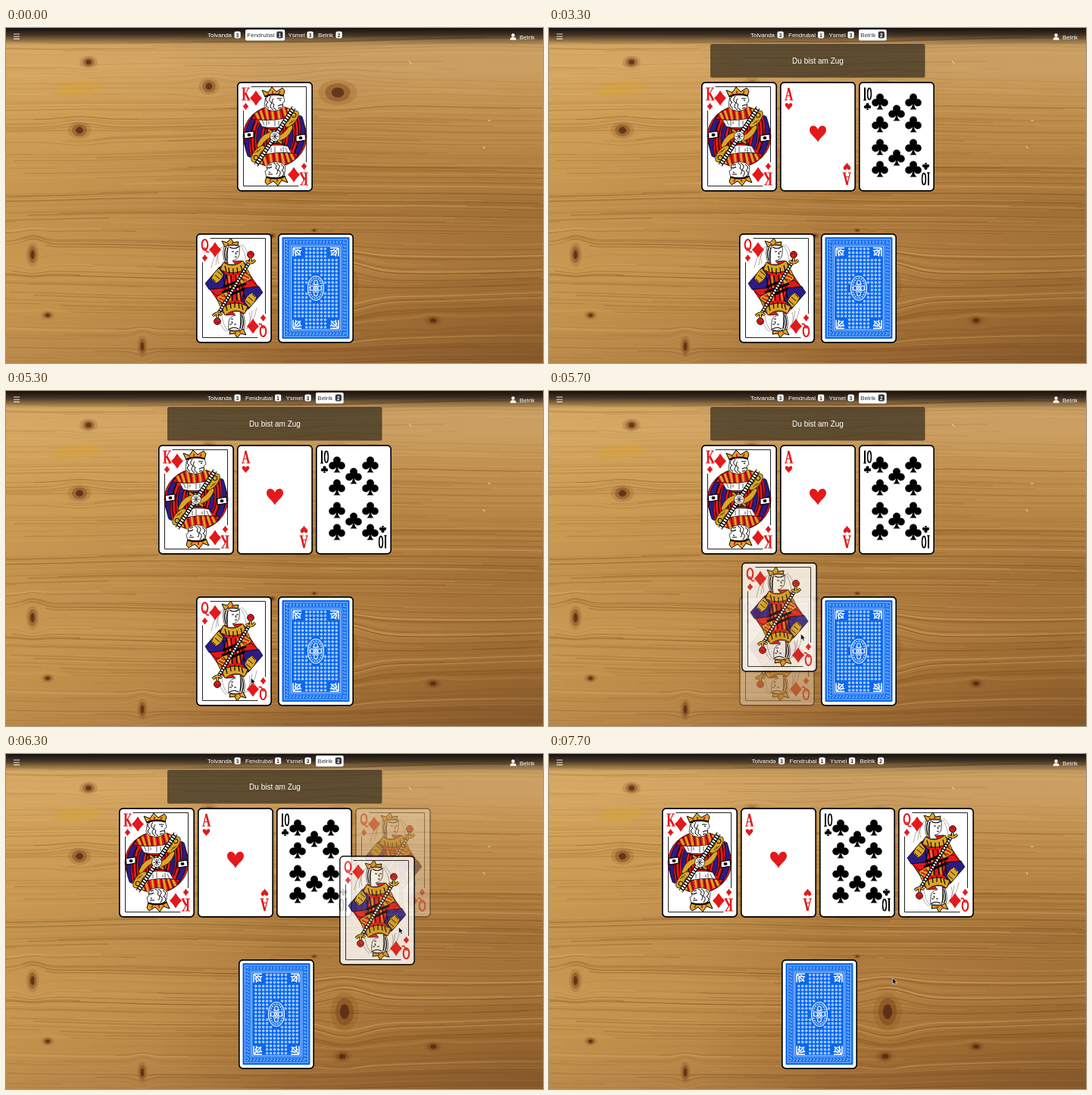
Animation, 709 px wide and 442 px high, one loop 8000 ms. Source, as an HTML page with a canvas:

```html
<!DOCTYPE html>
<html lang="de">
<head>
<meta charset="utf-8">
<title>Kartenspiel</title>
<style>
  html, body { margin: 0; width: 100%; height: 100%; overflow: hidden; background: #b5853f; }
  canvas { display: block; }
</style>
</head>
<body>
<canvas id="stage" width="709" height="442"></canvas>
<script>
const W = 709, H = 442, LOOP = 8000, TAU = Math.PI * 2;
const RED = '#e3191b', BLUE = '#2b1b86', GOLD = '#dba622', INK = '#000';
const CARD_W = 100, CARD_H = 145;
const FONT = '"Liberation Sans", Arial, sans-serif';

// ---------- helpers ----------
function picture(w, h, paint) {
  const canvas = document.createElement('canvas');
  canvas.width = w;
  canvas.height = h;
  paint(canvas.getContext('2d'));
  return canvas;
}

function shape(g, d, fill, stroke, width = 0.7) {
  const path = new Path2D(d);
  if (fill) { g.fillStyle = fill; g.fill(path); }
  if (stroke) { g.strokeStyle = stroke; g.lineWidth = width; g.stroke(path); }
}

const line = (g, d, color, width) => shape(g, d, null, color, width);

function oval(g, x, y, rx, ry, angle, fill, stroke, width = 0.7) {
  g.beginPath();
  g.ellipse(x, y, rx, ry, angle, 0, TAU);
  if (fill) { g.fillStyle = fill; g.fill(); }
  if (stroke) { g.strokeStyle = stroke; g.lineWidth = width; g.stroke(); }
}

function box(g, x, y, w, h, r, fill) {
  g.beginPath();
  g.roundRect(x, y, w, h, r);
  g.fillStyle = fill;
  g.fill();
}

function wash(g, gradient, stops, height = H) {
  stops.forEach(([at, color]) => gradient.addColorStop(at, color));
  g.fillStyle = gradient;
  g.fillRect(0, 0, W, height);
}

function write(g, text, x, y, font, color, align = 'left') {
  g.font = `${font} ${FONT}`;
  g.fillStyle = color;
  g.textAlign = align;
  g.fillText(text, x, y);
}

function turnTwice(g, paint) {
  paint(g);
  g.save();
  g.translate(CARD_W, CARD_H - 1);
  g.rotate(Math.PI);
  paint(g);
  g.restore();
}

// ---------- table ----------
function randomizer(seed) {
  return () => {
    seed = (seed * 1664525 + 1013904223) % 4294967296;
    return seed / 4294967296;
  };
}

const knots = [
  [109, 45, 7, 6], [97, 135, 9, 8], [268, 77, 8, 8], [438, 85, 15, 12],
  [447, 340, 11, 18], [564, 386, 7, 5], [35, 299, 5, 11], [444, 399, 8, 6],
  [180, 420, 4, 10], [55, 379, 5, 4], [351, 274, 4, 3], [407, 267, 3, 2]
];

function bend(x, y) {
  let shift = 3 * Math.sin(x / 150 + y / 70) + Math.sin(x / 60 + y / 31);
  for (const [kx, ky, rx, ry] of knots) {
    const dx = (x - kx) / (rx * 3.4), dy = (y - ky) / (ry * 2.2);
    shift += ry * Math.tanh(dy * 3) * Math.exp(-dx * dx - dy * dy);
  }
  return y + shift;
}

const table = picture(W, H, g => {
  const rnd = randomizer(11);
  wash(g, g.createLinearGradient(0, 0, 0, H), [
    [0, '#c79c62'], [.12, '#cb9f62'], [.22, '#c1914f'], [.36, '#b98745'], [.49, '#b07d3f'], [.52, '#a57438'],
    [.62, '#ae7b3e'], [.72, '#b48142'], [.86, '#a87538'], [1, '#976634']
  ]);
  wash(g, g.createLinearGradient(0, 0, 380, 0), [
    [0, 'rgba(226,178,100,.48)'], [.5, 'rgba(226,178,100,.34)'], [1, 'rgba(226,178,100,0)']
  ]);
  wash(g, g.createRadialGradient(W, H, 0, W, H, 300), [
    [0, 'rgba(80,45,14,.28)'], [1, 'rgba(80,45,14,0)']
  ]);

  for (let i = 0; i < 420; i++) {
    const y = rnd() * H, from = rnd() * W - 250, to = from + 150 + rnd() * 600;
    const lower = y > 210 && y < 340 ? 1.4 : 1;
    g.beginPath();
    for (let x = from; x <= to; x += 8) g.lineTo(x, bend(x, y));
    g.strokeStyle = rnd() < .58
      ? `rgba(105,58,16,${(.05 + rnd() * .15) * lower})`
      : `rgba(235,192,122,${.05 + rnd() * .15})`;
    g.lineWidth = .5 + rnd() * 1.3;
    g.stroke();
  }
  for (const y of [228, 330]) {
    g.beginPath();
    for (let x = 0; x <= W; x += 8) g.lineTo(x, bend(x, y));
    g.strokeStyle = 'rgba(85,48,16,.3)';
    g.lineWidth = 1.2;
    g.stroke();
  }
  oval(g, 95, 80, 32, 9, -.1, 'rgba(212,162,52,.45)');
  for (const [x, y, rx, ry] of knots) {
    oval(g, x, y, rx * 1.7, ry * 1.4, 0, 'rgba(130,72,24,.2)');
    oval(g, x, y, rx * 1.1, ry, 0, 'rgba(112,58,20,.4)');
    oval(g, x, y, rx * .55, ry * .55, 0, 'rgba(66,30,14,.65)');
  }
  line(g, 'M532 43L535 47M636 122H640M630 156L632 159', '#e6d3b4', 1.2);

  wash(g, g.createLinearGradient(0, 0, 0, 23), [
    [0, 'rgba(14,11,12,.96)'], [.4, 'rgba(18,14,13,.74)'], [.75, 'rgba(18,14,13,.27)'], [1, 'rgba(18,14,13,0)']
  ], 23);
});

// ---------- cards ----------
const ball = (x, y, r) => `M${x - r} ${y}a${r} ${r} 0 1 1 ${2 * r} 0a${r} ${r} 0 1 1 ${-2 * r} 0`;
const suits = {
  diamond: 'M0-1Q.35-.4 .8 0Q.35 .4 0 1Q-.35 .4-.8 0Q-.35-.4 0-1Z',
  heart: 'M0 1C-.3 .4-1 .1-1-.45C-1-1.1-.2-1.15 0-.5C.2-1.15 1-1.1 1-.45C1 .1 .3 .4 0 1Z',
  club: ball(0, -.5, .45) + ball(-.53, .14, .45) + ball(.53, .14, .45) +
    'M-.2-.2H.2L.1 .3Q.15 .8 .42 .95H-.42Q-.15 .8-.1 .3Z'
};

function pip(g, suit, x, y, size, color) {
  g.save();
  g.translate(x, y);
  g.scale(size, size);
  shape(g, suits[suit], color);
  g.restore();
}

const ranks = {
  K: [['M9 8V24M11 15L16 24', 2.6], ['M6 8H12M6 24H12M13 8H17M13 24H17.5M15.5 8L10 17', 1.2]],
  Q: [['M7.7 15a3.8 7 0 1 0 7.6 0a3.8 7 0 1 0-7.6 0', 2.1], ['M9.5 20Q12 18 13 22T17.3 24', 1.6]],
  A: [['M11.3 8L15.3 24', 2.6], ['M11.3 8L7.5 24M9 18.5H14M6 24H10M12.5 24H17.5', 1.2]],
  10: [['M8 7.5V24', 2], ['M6.3 24H9.8M11.6 15.8a2.4 7.6 0 1 0 4.8 0a2.4 7.6 0 1 0-4.8 0', 1.6]]
};

function corner(g, rank, suit, color) {
  for (const [d, width] of ranks[rank]) line(g, d, color, width);
  pip(g, suit, 11.5, 32.5, 4.8, color);
}

function card(paint) {
  return picture(CARD_W, CARD_H, g => {
    g.beginPath();
    g.roundRect(.8, .8, 98.4, 143, 5);
    g.fillStyle = '#fff';
    g.fill();
    g.strokeStyle = INK;
    g.lineWidth = 1.7;
    g.stroke();
    paint(g);
  });
}

function court(rank, figure, sash) {
  return card(g => {
    turnTwice(g, () => {
      line(g, 'M18.5 6.5H91.5M8.5 38V137.5', '#222', 1);
      g.save();
      g.clip(new Path2D('M-5 158L105-14H-5Z'));
      figure(g);
      g.restore();
    });
    sash(g);
    turnTwice(g, () => {
      pip(g, 'diamond', 25, 21.5, 10, RED);
      corner(g, rank, 'diamond', RED);
    });
  });
}

function beads(g, d, width) {
  line(g, d, INK, width);
  g.setLineDash([2.2, 1.5]);
  line(g, d, '#fff', width - 2);
  g.setLineDash([]);
}

const king = court('K', g => {
  oval(g, 50, 72, 42, 40, 0, RED, INK);
  shape(g, 'M22 43Q3 68 14 98L18 100Q11 72 26 47Z', BLUE, INK);
  shape(g, 'M30 55Q22 72 29 96L34 92Q28 74 35 58Z', BLUE, INK);
  line(g, 'M24 52Q14 74 22 102M28 54Q19 74 26 99M38 60Q33 74 37 92M41 61Q37 74 40 86', INK, 1.2);
  shape(g, 'M26 84Q33 65 50 66L52 71Q38 72 29 90Z', GOLD, INK);
  shape(g, 'M36 61Q50 66 68 57L62 70L48 68Z', '#3a2a20', INK);
  line(g, 'M41 63L46 67M49 64V68M56 62L53 67', GOLD, 2);
  shape(g, 'M9 67L22 65V73L10 75Z', '#fff', INK, 1.2);
  oval(g, 16, 70, 2.5, 2, 0, INK);
  oval(g, 28, 95, 13, 6, -.9, GOLD, INK);
  oval(g, 25, 100, 3, 3, 0, null, INK, 1);
  line(g, 'M24 94L28 90M29 97L33 91M27 93L31 88', '#3d2a06', .9);
  shape(g, 'M26 46Q50 55 75 40L68 57Q50 63 33 59Z', '#fff', INK);
  line(g, 'M39 50V58M42 52V56M50 51V59M55 51V57M63 48V56M33 50L36 57', '#333', .8);
  shape(g, 'M19 49Q24 38 39 33H62Q74 36 79 44Q50 54 19 49Z', RED, INK);
  line(g, 'M25 41L29 49M31 38L35 50M38 34L41 50M46 34L48 50M54 34L56 49M61 33L65 47M67 36L72 45', GOLD, 2.8);
  line(g, 'M22 44L26 50M28 39L32 50M34 36L38 51M42 34L44 50M50 34L52 50M58 34L61 48M64 34L69 46', INK, .7);
  shape(g, 'M38 17H61L63 26L60 28Q63 35 53 38Q41 40 36 32Z', '#fff', INK);
  line(g, 'M41 19Q35 24 41 27Q35 31 42 35M45 19Q40 25 46 28Q41 33 48 37M48 22Q44 27 49 30Q46 34 52 37', INK, 1);
  line(g, 'M53 22H59M56 24L58 25M54 32Q58 29 61 31M54 35L58 34', INK, 1.1);
  shape(g, 'M37 20L33 11L41 14L46 7L52 13L60 8L63 12L61 19Q49 15 37 20Z', GOLD, INK, 1);
  line(g, 'M40 15L43 17M47 12V16M57 12L55 16', RED, 2);
  line(g, 'M37 19Q49 14 61 18', INK, 1.4);
}, g => {
  beads(g, 'M25 110L75 34', 6);
  oval(g, 50, 72, 6.5, 6.5, 0, '#fff', INK);
  line(g, 'M45 72H55M50 67V77M47 68L53 76M53 68L47 76', '#222', .9);
});

const queen = court('Q', g => {
  line(g, 'M36 16Q27 26 26 42M33 18Q23 28 20 46M58 15Q65 24 66 36M60 14Q69 22 70 34M31 22Q27 30 30 40', '#777', .6);
  shape(g, 'M37 38L60 36L74 46L87 78L63 106H40L13 66Z', RED, INK);
  shape(g, 'M31 44L12 66L17 74L36 72L40 56Z', BLUE, INK);
  shape(g, 'M30 46Q22 52 20 60L26 66Q34 62 36 54Z', GOLD, INK);
  line(g, 'M25 55L31 60M28 50L34 55M22 60L26 64', INK, 1);
  shape(g, 'M36 72L18 74L27 82L40 80Z', RED, INK);
  shape(g, 'M40 76L27 84L31 95L38 103L46 88Z', GOLD, INK);
  line(g, 'M30 85L40 90M33 82L43 85M32 92L39 96', RED, 2.2);
  line(g, 'M29 88L38 94M36 80L43 88', INK, 1);
  line(g, 'M40 54L43 74M46 55L48 74M52 55L53 70M58 54L57 66M36 58L39 74', INK, 1.2);
  line(g, 'M43 56L45 72M55 55V66', GOLD, 1.6);
  shape(g, 'M36 38Q48 47 62 36L66 46Q50 57 32 48Z', GOLD, INK);
  line(g, 'M38 43L40 50M43 45L44 53M49 46V54M54 45L55 53M59 42L61 50', INK, 1.2);
  line(g, 'M36 71L62 60M34 78L50 72', INK, 3);
  shape(g, 'M66 42L78 40L74 50L66 54Z', '#fff', INK);
  line(g, 'M69 44L74 43M68 47L75 45M68 50L73 48', INK, .6);
  shape(g, 'M37 17Q34 28 38 38H43V20Z', '#fff', INK);
  line(g, 'M39 19Q36 28 40 37M42 19Q39 28 42 37', INK, 1.4);
  shape(g, 'M43 16H57Q58 26 56 31Q53 36 48 36L52 41H42Q40 26 43 16Z', '#fff', INK);
  line(g, 'M44 18Q51 22 57 17M47 24H50M53 24H56M52 25L53 28M51 31H54', INK, 1.1);
  shape(g, 'M38 18L34 10L41 12L46 6L49 12L56 11L55 16Q45 13 38 18Z', GOLD, INK, 1);
  line(g, 'M42 13V15M48 12V14', RED, 2);
}, g => {
  beads(g, 'M28 108L72 35', 4.6);
  turnTwice(g, () => {
    line(g, 'M66 36Q72 42 78 35M72 40V33', INK, 3.6);
    line(g, 'M66 36Q72 42 78 35M72 40V33', GOLD, 2.2);
    oval(g, 72, 28, 4.4, 4.4, 0, RED, INK, .9);
    line(g, 'M69 28Q72 24 74 29', '#700', .9);
  });
});

const ace = card(g => {
  turnTwice(g, () => corner(g, 'A', 'heart', RED));
  pip(g, 'heart', 50, 68.5, 11, RED);
});

const ten = card(g => {
  turnTwice(g, () => corner(g, 10, 'club', INK));
  for (const y of [26, 56, 86, 115]) for (const x of [28, 72]) pip(g, 'club', x, y, 11, INK);
  pip(g, 'club', 50, 41, 11, INK);
  pip(g, 'club', 50, 100, 11, INK);
});

const back = card(g => {
  const frame = (inset, width, color) => {
    g.lineWidth = width;
    g.strokeStyle = color;
    g.strokeRect(inset, inset - .5, 100 - 2 * inset, 145 - 2 * inset);
  };
  box(g, 5.5, 5, 89, 134, 1, '#0b69ef');
  frame(8.5, .8, '#c4dcff');
  g.setLineDash([2.6, 1.8]);
  frame(11, 1.1, '#a9ccff');
  g.lineDashOffset = 2.2;
  frame(13, 1.1, '#a9ccff');
  g.setLineDash([]);
  frame(15.5, .7, '#b4d2ff');
  frame(17.5, .8, '#e6f0ff');
  for (let row = 0; row < 22; row++) for (let col = 0; col < 12; col++) {
    const x = 22.8 + col * 4.95, y = 20.5 + row * 4.92;
    const inCorner = Math.min(x, 100 - x) < 34 && Math.min(y, 144 - y) < 32;
    const fromCenter = Math.hypot((x - 50) / 13, (y - 72) / 18);
    if (!inCorner && fromCenter > 1) oval(g, x, y, 1.25, 1.25, 0, '#7db2ff', '#eaf3ff', .8);
  }
  for (const sx of [1, -1]) for (const sy of [1, -1]) {
    g.save();
    g.translate(50, 72.2);
    g.scale(sx, sy);
    line(g, 'M-30-53H-19M-30-53V-42M-29-52L-20-43M-25-51Q-21-48-19-50M-28-48Q-25-44-27-42', '#fff', 1.6);
    oval(g, -24, -47, 3.2, 3.2, 0, null, '#fff', 1.2);
    g.restore();
  }
  oval(g, 50, 72.2, 10.5, 16, 0, '#0b69ef', '#fff', 1.1);
  g.setLineDash([2, 1.3]);
  oval(g, 50, 72.2, 8.2, 13.3, 0, null, '#dbe9ff', 1.6);
  g.setLineDash([]);
  for (const [dx, dy] of [[0, 0], [0, -7.5], [0, 7.5], [-5, 0], [5, 0]]) {
    oval(g, 50 + dx, 72.2 + dy, 2.4, 3, 0, null, '#fff', 1.1);
  }
  line(g, 'M46 66L54 78M54 66L46 78', '#fff', 1);
});

// ---------- interface ----------
const players = [
  { name: 'Tolvanda', score: 3, badge: 35.5, advance: 50 },
  { name: 'Fendrubal', score: 1, badge: 39, advance: 53.5 },
  { name: 'Ysmel', score: 3, badge: 25, advance: 39.5 },
  { name: 'Belrik', score: 2, badge: 23.5, advance: 38 }
];

function drawPlayers(g, active) {
  let x = active < 0 ? 267.5 : 266;
  players.forEach(({ name, score, badge, advance }, i) => {
    const on = i === active, left = x + (on ? 2.3 : 0);
    if (on) box(g, x, 2, badge + 13.2, 14.5, 2, '#fff');
    write(g, name, left, 12, '8px', on ? '#343a40' : '#fff');
    box(g, left + badge, 4.6, 8.2, 9, 2, on ? '#343a40' : '#fff');
    write(g, score, left + badge + 4.1, 11.5, 'bold 6.4px', on ? '#fff' : '#212529', 'center');
    x += advance + (on ? 3 : 0);
  });
}

function drawBar(g, active) {
  line(g, 'M10 8H18M10 11.2H18M10 14.4H18', '#e4e0dc', 1.1);
  drawPlayers(g, active);
  oval(g, 669.5, 9.6, 2.2, 2.3, 0, '#fff');
  shape(g, 'M665.6 15.8Q665.6 12.3 668 12.3H671Q673.6 12.3 673.6 15.8Z', '#fff');
  write(g, players[3].name, 678, 15, '8px', '#fff');
}

function drawRow(g, cards, center, y, pitch, faded) {
  cards.forEach((face, i) => {
    g.globalAlpha = face === faded ? .3 : 1;
    g.drawImage(face, center - 50 + (i - (cards.length - 1) / 2) * pitch, y);
  });
  g.globalAlpha = 1;
}

function drawPointer(g, x, y) {
  g.save();
  g.translate(x, y);
  shape(g, 'M.4 .4V8.6L2.4 6.9L3.8 9.8L5.3 9.1L4 6.3H6.6Z', '#111', '#fff', .6);
  g.restore();
}

// ---------- timeline ----------
const GRIP = [78, 94];
const pointerAt = [
  [4500, 630, 415], [4700, 417, 430], [4900, 378, 394], [5100, 341, 386], [5300, 323, 378],
  [5500, 321, 361], [5700, 332, 320], [5900, 389, 284], [6100, 462, 247], [6300, 518, 228],
  [6500, 544, 200], [6700, 538, 200], [6900, 539, 199], [7100, 566, 312], [7300, 567, 313],
  [7500, 497, 305], [7700, 453, 295]
];

function render(g, t) {
  const dragging = t >= 5500 && t < 6700;
  const placed = t >= 6300;
  const myTurn = t >= 3300 && t < 6900;
  const active = t < 500 ? 1 : t < 3300 ? 2 : myTurn ? 3 : -1;
  const trick = [king, ace, ten, queen].slice(0, t < 500 ? 1 : t < 3300 ? 2 : placed ? 4 : 3);
  const faded = dragging ? queen : null;

  g.drawImage(table, 0, 0);
  drawBar(g, active);
  if (myTurn) {
    box(g, 213, 21, 283.5, 44.5, 2.5, 'rgba(28,26,20,.62)');
    write(g, 'Du bist am Zug', 355, 47, '10px', '#fff', 'center');
  }
  drawRow(g, trick, 355, 71, 104, faded);
  drawRow(g, placed ? [back] : [queen, back], placed ? 357 : 355, 271, 108, faded);

  const pointer = pointerAt.filter(([start]) => t >= start).pop();
  if (!pointer) return;
  const [, x, y] = pointer;
  if (dragging) {
    g.globalAlpha = .8;
    g.drawImage(queen, x - GRIP[0], y - GRIP[1]);
    g.globalAlpha = 1;
  }
  drawPointer(g, x, y);
}

const stage = document.getElementById('stage').getContext('2d');
const begin = performance.now();
function tick() {
  render(stage, (performance.now() - begin) % LOOP);
  requestAnimationFrame(tick);
}
tick();
</script>
</body>
</html>
```
